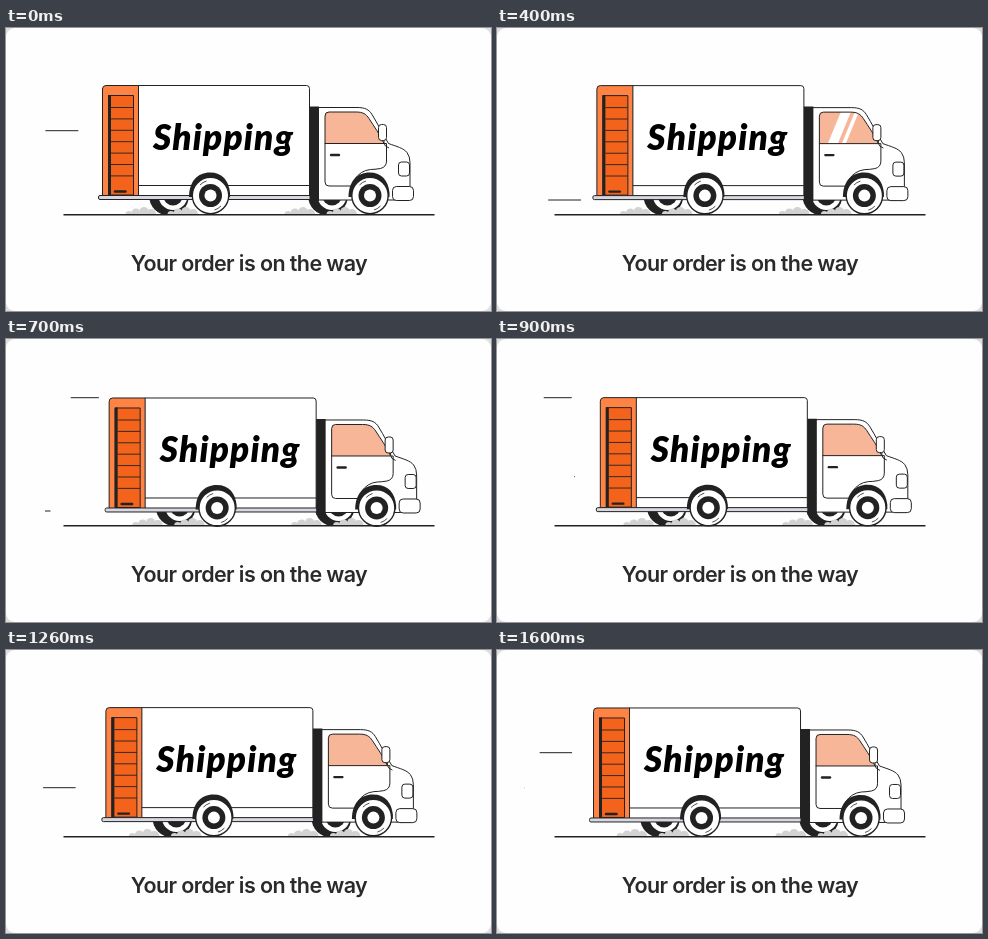
Write an HTML page that moves like this. It is 485 px wide and 283 px high and loops after 1630 ms.

```html
<!DOCTYPE html>
<html lang="en">
<head>
<meta charset="utf-8">
<title>Shipping</title>
<style>
  html, body { margin: 0; width: 100%; height: 100%; overflow: hidden; background: #dedede; }
  svg { display: block; width: 485px; height: 283px; }
  .line { fill: none; stroke: #222; }
  .box { fill: #fff; stroke: #222; }
  .ink { fill: #222; }
</style>
</head>
<body>
<svg viewBox="0 0 485 283">
  <defs>
    <clipPath id="aboveGround"><rect y="165" width="485" height="21"/></clipPath>
    <clipPath id="pane"><path id="glass" d="M319 115.5V88q0-4 4-4h27c7 0 10 2 13 6.500 5 8 10.500 15 15 25z"/></clipPath>
    <g id="wheel">
      <path class="ink" d="M-21.500 1.500C-21.500-14-13-23-.5-23S18-15 19.500-3V1.500z"/>
      <circle class="box" r="18.200" stroke-width="1.400"/>
      <circle class="ink" r="11.500"/>
      <circle r="6" fill="#fff"/>
      <path class="line" d="M-10.500-10.500A15 15 0 0 1-4-14.500M10.500 10.500A15 15 0 0 1 4 14.500" stroke-width=".8"/>
    </g>
    <g id="farWheel">
      <circle class="ink" r="20"/>
      <circle cx="4" r="14.500" fill="#fff"/>
      <circle class="ink" cx="4" r="10"/>
    </g>
    <g id="dust" fill="#d2d2d2">
      <circle cx="5" cy="186.500" r="3.500"/><circle cx="12" cy="185" r="4.500"/>
      <circle cx="20" cy="183.500" r="4.500"/><circle cx="27" cy="186" r="5"/>
    </g>
  </defs>

  <rect width="485" height="283" rx="9" fill="#fefefe"/>
  <g id="wind" class="line"></g>

  <g id="under" clip-path="url(#aboveGround)">
    <use href="#dust" x="118"/>
    <use href="#dust" x="277"/>
    <use href="#farWheel" x="163" y="167.500"/>
    <use href="#farWheel" x="322" y="167.500"/>
    <use href="#dust" x="160"/>
    <use href="#dust" x="319"/>
  </g>

  <g id="truck">
    <path d="M133 57.500H100q-3.500 0-3.500 3.500V168H133z" fill="#ff8344" stroke="#222"/>
    <path d="M102.500 67.500H127.500V167H102.500z" fill="#f4631b" stroke="#222"/>
    <path class="ink" d="M102 67h3v100H102z"/>
    <path id="slats" class="line" stroke-width=".9"/>
    <path class="line" d="M109 163.500h10.500" stroke-width="2.400" stroke-linecap="round"/>
    <path class="box" d="M132.500 57.500H300.500q3 0 3 3V168H132.500z"/>
    <path class="line" d="M132.500 157.500H303.500"/>
    <rect x="92.500" y="167.500" width="214" height="4" rx="1.500" fill="#d8d8e2" stroke="#222"/>
    <text x="217.500" y="121.500" text-anchor="middle" font-family="Lato, sans-serif" font-size="35" font-weight="900" font-style="italic" letter-spacing="1.2">Shipping</text>

    <path class="box" d="M310 79.500H351c8 0 12 2 15 7 5 8 11 20 16.500 29 8 3 15 4.500 18.500 9q3 4 3 10V161q0 11-10 11H310z"/>
    <path class="ink" d="M303.500 78.500H313V173H303.500z"/>
    <use href="#glass" fill="#f8b698"/>
    <g clip-path="url(#pane)">
      <path id="glare" d="M341 83h10L337 117H327zM355 83h4L345 117H341z" fill="#fff"/>
    </g>
    <use href="#glass" class="line"/>
    <path class="line" d="M319 115V154q0 4 4 4H345M378 115.500H380.500V133q0 6-6 7.500-6 1-10 1-10 1-16 10"/>
    <path class="line" d="M325 127h8" stroke-width="2.400" stroke-linecap="round"/>
    <path class="line" d="M378 112v3q0 3 5 5"/>
    <rect class="box" x="372.500" y="96.500" width="8" height="16" rx="3"/>
    <rect class="box" x="392.500" y="134" width="11" height="14" rx="3"/>
    <rect class="box" x="386.500" y="158.500" width="21" height="14" rx="4"/>
    <use href="#wheel" x="204.500" y="167.500"/>
    <use href="#wheel" x="364" y="167.500"/>
  </g>

  <path class="line" d="M57.500 186.700H428.500" stroke-width="1.600"/>
  <text x="243" y="243" text-anchor="middle" fill="#2a2a2a" font-family="Inter, sans-serif" font-size="21.500" font-weight="600" letter-spacing="-.6">Your order is on the way</text>
</svg>
<script>
  const LOOP = 1630, FRAMES = 49;
  const $ = id => document.getElementById(id);
  const clamp = u => Math.max(0, Math.min(1, u));
  const easeOut = u => Math.sin(clamp(u) * Math.PI / 2);
  const easeInOut = u => (1 - Math.cos(clamp(u) * Math.PI)) / 2;
  const sway = t => (1 - Math.cos(2 * Math.PI * t / LOOP)) / 2;
  const bounce = t => Math.abs(Math.sin(4 * Math.PI * t / LOOP));

  $('slats').setAttribute('d', Array.from({ length: 7 }, (_, i) => `M105 ${79.5 + i * 11.4}H127.5`).join(''));

  // Each streak grows leftwards from its right end, then its tail catches up.
  const streaks = [
    { y: 172, right: 90, start: 85 },
    { y: 58.7, right: 93, start: 485 },
    { y: 137.7, right: 78, start: 893 },
    { y: 102.7, right: 78, start: 1318 }
  ].map(s => {
    const path = document.createElementNS('http://www.w3.org/2000/svg', 'path');
    return { ...s, path: $('wind').appendChild(path) };
  });

  function draw(now) {
    const t = Math.floor((now % LOOP) / LOOP * FRAMES + 0.01) * LOOP / FRAMES;
    const x = 7 * sway(t);
    $('truck').setAttribute('transform', `translate(${x} ${1.9 * bounce(t)})`);
    $('under').setAttribute('transform', `translate(${x} 0)`);
    $('glare').setAttribute('transform', `translate(${(t - 400) * 0.25} 0)`);
    for (const { y, right, start, path } of streaks) {
      const age = (t - start + LOOP) % LOOP;
      const head = right - 51 * easeOut(age / 571);
      const tail = right - 51 * easeInOut((age - 197) / 530);
      path.setAttribute('d', tail - head > 0.2 ? `M${head} ${y}H${tail}` : '');
    }
  }

  const begin = performance.now();
  function tick() {
    draw(performance.now() - begin);
    requestAnimationFrame(tick);
  }
  tick();
</script>
</body>
</html>
```
